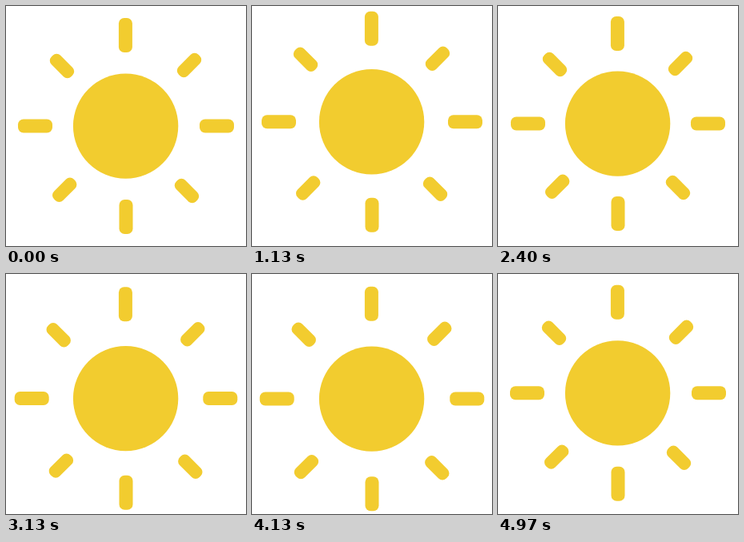
Animation, 300 px wide and 300 px high, one loop 5 s. Source, as an HTML page:

```html
<!DOCTYPE html>
<html lang="en">
<head>
<meta charset="utf-8">
<title>Sun</title>
<style>
  html, body { margin: 0; width: 100%; height: 100%; overflow: hidden; background: #fff; }
  svg { display: block; width: 100%; height: 100%; }
</style>
</head>
<body>
<svg id="stage" viewBox="0 0 300 300" fill="#f2cc2f">
  <g id="sun"><circle cx="149.6" cy="0.1" r="65.7"/></g>
</svg>
<script>
const LOOP = 5;

// Time in seconds, height of the centre, outward shift of the rays
const KEYS = [
  [0, 150, 0], [0.2, 152.5, -3], [0.4, 153, -3.5], [0.56, 152, -1],
  [0.72, 150.2, 3], [0.9, 146, 6.5], [1.12, 144.7, 3], [1.3, 147, -2],
  [1.45, 150, -3.5], [1.6, 152, 0.8], [1.8, 151, 4], [1.98, 146, 6.4],
  [2.17, 144, 4], [2.4, 147, -1], [2.7, 151, -3], [2.9, 155, 0.5],
  [3.12, 155.5, 4.3], [3.3, 150.5, 6.5], [3.5, 148, 2], [3.7, 150, -4],
  [3.9, 155, -1], [4.12, 156, 5.3], [4.28, 152, 6.3], [4.44, 147, 4],
  [4.62, 144.5, 0], [4.8, 145, -1], [4.96, 148.8, 0]
];

// Resting centre relative to the sun, direction, length, width, angle
const RAYS = [
  [149.4, -113.5, 0, -1, 43, 17, 90],
  [150, 113.5, 0, 1, 43, 17, 90],
  [36.5, 0, -1, 0, 43, 17, 0],
  [263.5, 0, 1, 0, 43, 17, 0],
  [70, -75, -1, -1, 35, 16, 45],
  [229, -76, 1, -1, 35, 16, -45],
  [73.2, 79.8, -1, 1, 35, 16, -45],
  [226, 81, 1, 1, 35, 16, 45]
];

const sun = document.getElementById("sun");

const rays = RAYS.map(([x, y, dx, dy, length, width, angle]) => {
  const node = document.createElementNS("http://www.w3.org/2000/svg", "rect");
  const attributes = { x: -length / 2, y: -width / 2, width: length, height: width, rx: 6.8 };
  for (const name in attributes) node.setAttribute(name, attributes[name]);
  sun.append(node);
  return { node, x, y, dx, dy, angle };
});

// Key by index, continued beyond both ends of the loop
function keyAt(i) {
  const n = KEYS.length;
  const turn = Math.floor(i / n);
  const [time, ...values] = KEYS[i - turn * n];
  return [time + turn * LOOP, ...values];
}

// Smooth curve through the keys
function sample(time, channel) {
  let i = KEYS.length - 1;
  while (KEYS[i][0] > time) i--;
  const [a, b, c, d] = [i - 1, i, i + 1, i + 2].map(keyAt);
  const span = c[0] - b[0];
  const u = (time - b[0]) / span;
  const slopeB = (c[channel] - a[channel]) / (c[0] - a[0]) * span;
  const slopeC = (d[channel] - b[channel]) / (d[0] - b[0]) * span;
  const rise = c[channel] - b[channel];
  return b[channel] + u * (slopeB + u * (3 * rise - 2 * slopeB - slopeC
    + u * (slopeB + slopeC - 2 * rise)));
}

// 25 poses a second shown on a 30 Hz grid
function poseTime(ms) {
  const tick = Math.floor((ms % (LOOP * 1000)) * 0.03 + 0.12) % (LOOP * 30);
  return Math.floor(tick * 5 / 6) / 25;
}

function draw(ms) {
  const time = poseTime(ms);
  const shift = sample(time, 2);
  sun.setAttribute("transform", `translate(0 ${sample(time, 1)})`);
  for (const { node, x, y, dx, dy, angle } of rays) {
    node.setAttribute("transform",
      `translate(${x + dx * shift} ${y + dy * shift}) rotate(${angle})`);
  }
}

const start = performance.now();
function tick(now) {
  draw(Math.max(0, now - start));
  requestAnimationFrame(tick);
}
draw(0);
requestAnimationFrame(tick);
</script>
</body>
</html>
```
